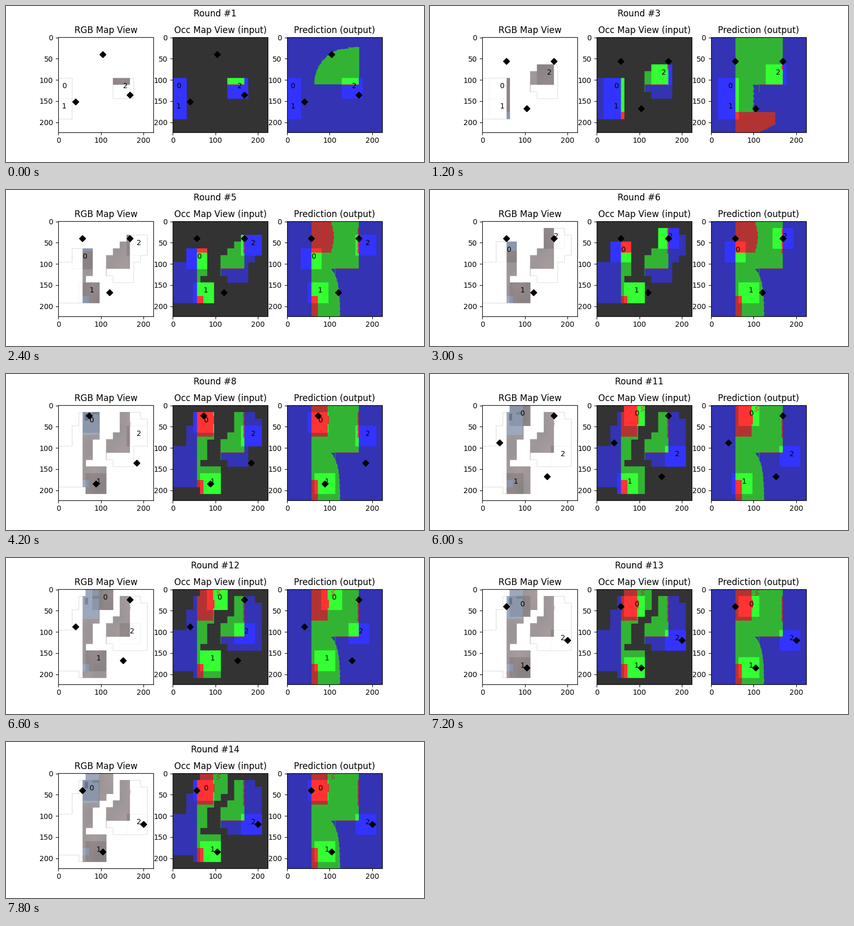
These frames come from a looping animation (800 px wide and 300 px high, 8000 ms). A matplotlib script:

```python
import numpy as np
import matplotlib.pyplot as plt
from matplotlib.animation import FuncAnimation

SIZE = 224
HALF = 24            # half width of a robot's view
STEP = 16            # longest move per round along each axis
FRAMES_PER_ROUND = 3
FRAMES = 40
ROUNDS = 14
WALL, FLOOR, FREE = range(3)  # also the colour channel of each class

Y, X = np.mgrid[:SIZE, :SIZE]


def walk(start, *stops):
    """Step towards each stop in turn; a stop already reached is a pause."""
    path = [np.array(start)]
    for stop in stops:
        while True:
            path.append(path[-1] + np.clip(stop - path[-1], -STEP, STEP))
            if (path[-1] == stop).all():
                break
    return path


PATHS = [
    walk((8, 120), (40, 120), (56, 72), (72, 40), (72, 40), (72, 40),
         (104, 24), (72, 40)),
    walk((8, 168), (88, 168), (88, 184), (88, 184), (88, 184), (88, 184),
         (72, 184), (88, 168), (88, 184), (88, 184)),
    walk((152, 120), (136, 104), (152, 88), (184, 56), (168, 40), (184, 56),
         (184, 120), (168, 104), (184, 120), (184, 120)),
]

# Goals are renewed every second round
GOALS = [
    [(104, 40), (40, 152), (168, 136)],
    [(56, 56), (104, 168), (168, 56)],
    [(56, 40), (120, 168), (168, 40)],
    [(72, 24), (88, 184), (184, 136)],
    [(72, 40), (88, 184), (184, 136)],
    [(40, 88), (152, 168), (168, 24)],
    [(56, 40), (104, 184), (200, 120)],
]


def box(x0, x1, y0, y1):
    return (X >= x0) & (X < x1) & (Y >= y0) & (Y < y1)


def window(x, y):
    return (abs(X - x) <= HALF) & (abs(Y - y) <= HALF)


def ripple(phase=0):
    return np.sin(Y * 0.9 + phase) * np.sin(Y * 0.37 + 1)


HALL = box(57, 168, 0, 112)
CORRIDOR = box(57, SIZE, 112, SIZE)
BUILDING = HALL | CORRIDOR & (X <= 112)
BLOCK = box(57, 95, 0, 74) | box(95, 98, 25, 45)
CORNER = box(57, 72, 176, SIZE)
EAST_WALL = box(160, 168, 16, 76) & (X >= 166 - 2 * abs(np.sin(Y / 5)))
SOUTH_WALL = box(112, 168, 111, 112)
SQUIGGLE = box(100, 116, 2, 15) & (abs(X - 107 - 3 * np.sin(Y * 0.8)) < 1.5)


def make_world():
    world = np.full((SIZE, SIZE), FREE)
    world[BUILDING] = FLOOR
    world[BLOCK | CORNER | EAST_WALL | SOUTH_WALL | SQUIGGLE] = WALL
    return world


def predict(rnd):
    guess = np.full((SIZE, SIZE), FREE)
    if rnd <= 2:
        dome = np.sqrt(np.clip(1 - (abs(168 - X) / 105) ** 2.5, 0, 1))
        guess[box(64, 169, 0, 111) & (Y > 111 - 88 * dome + 2 * ripple())] = FLOOR
        return guess

    guess[HALL] = FLOOR
    if rnd <= 4:
        guess[CORRIDOR & (X < 99 + 2 * ripple())] = FLOOR
        reach = 150 - 2 * np.maximum(0, Y - 205) + 2 * ripple()
        guess[CORRIDOR & (Y >= 176) & (X < reach)] = WALL
        return guess

    edge = 103 + 21 * (1 - np.exp((112 - Y) / 26)) + ripple(rnd)
    guess[CORRIDOR & (X < edge)] = FLOOR
    if rnd <= 6:
        bulge = 102 + 7 * np.sin(np.pi * Y / 74) + ripple()
        guess[box(57, SIZE, 0, 74) & (X < bulge)] = WALL
    guess[BLOCK | CORNER | EAST_WALL] = WALL
    return guess


def paint(classes, known, lit):
    image = np.full((SIZE, SIZE, 3), 51, np.uint8)
    for channel in (WALL, FLOOR, FREE):
        here = known & (classes == channel)
        image[here, channel] = 179
        image[here & lit, channel] = 255
    return image


def rim(mask):
    padded = np.pad(mask, 1)
    inner = (padded[:-2, 1:-1] & padded[2:, 1:-1]
             & padded[1:-1, :-2] & padded[1:-1, 2:])
    return mask & ~inner


def make_texture():
    tint = 4 * np.sin(X / 9 + Y / 31) + 3 * np.sin(Y / 13 - X / 23)
    colour = np.array([151, 142, 144]) + tint[..., None] * [1, 0.6, 0.4]
    colour[box(57, 95, 0, 70) | CORNER & (Y < 193)] = [148, 158, 178]
    colour[box(62, 70, 20, 36)] = [108, 126, 152]
    colour[box(80, 95, 16, 22)] = [124, 142, 154]
    return colour


WORLD = make_world()
TEXTURE = make_texture()


def rgb_view(known, views):
    image = np.full((SIZE, SIZE, 3), 255.0)
    for view in views:
        image[rim(view)] = 240
    image[rim(known)] = 212
    seen = known & BUILDING
    image[seen] = TEXTURE[seen] + 10
    lit = seen & np.logical_or.reduce(views)
    image[lit] = TEXTURE[lit] - 8
    image[known & box(168, 170, 38, 50) & (Y % 7 < 4)] = [185, 180, 220]
    return image.astype(np.uint8)


def build_scenes():
    known = np.zeros((SIZE, SIZE), bool)
    scenes = []
    for i in range(ROUNDS):
        views = [window(*path[i]) for path in PATHS]
        lit = np.logical_or.reduce(views)
        known = known | lit
        guess = np.where(known, WORLD, predict(i + 1))
        scenes.append((rgb_view(known, views),
                       paint(WORLD, known, lit),
                       paint(guess, np.ones_like(known), lit)))
    return scenes


SCENES = build_scenes()

fig, axes = plt.subplots(1, 3, figsize=(8, 3), dpi=100)
heading = fig.suptitle("Round #1")
images, markers, labels = [], [], []
titles = ["RGB Map View", "Occ Map View (input)", "Prediction (output)"]
for ax, title, picture in zip(axes, titles, SCENES[0]):
    ax.set_title(title)
    images.append(ax.imshow(picture))
    markers.append(ax.plot([], [], "kD", markersize=6)[0])
    labels.append([ax.text(0, 0, str(n)) for n in range(3)])
    ax.set(xlim=(-0.5, SIZE - 0.5), ylim=(SIZE - 0.5, -0.5),
           xticks=range(0, 201, 100), yticks=range(0, 201, 50))


def draw(frame):
    i = frame // FRAMES_PER_ROUND
    heading.set_text(f"Round #{i + 1}")
    for image, picture, marker, texts in zip(images, SCENES[i], markers, labels):
        image.set_data(picture)
        marker.set_data(*zip(*GOALS[i // 2]))
        for text, path in zip(texts, PATHS):
            text.set_position(path[i])
    return []


anim = FuncAnimation(fig, draw, frames=FRAMES, interval=200, repeat=True,
                     init_func=lambda: draw(0), blit=False)
plt.show()
```
